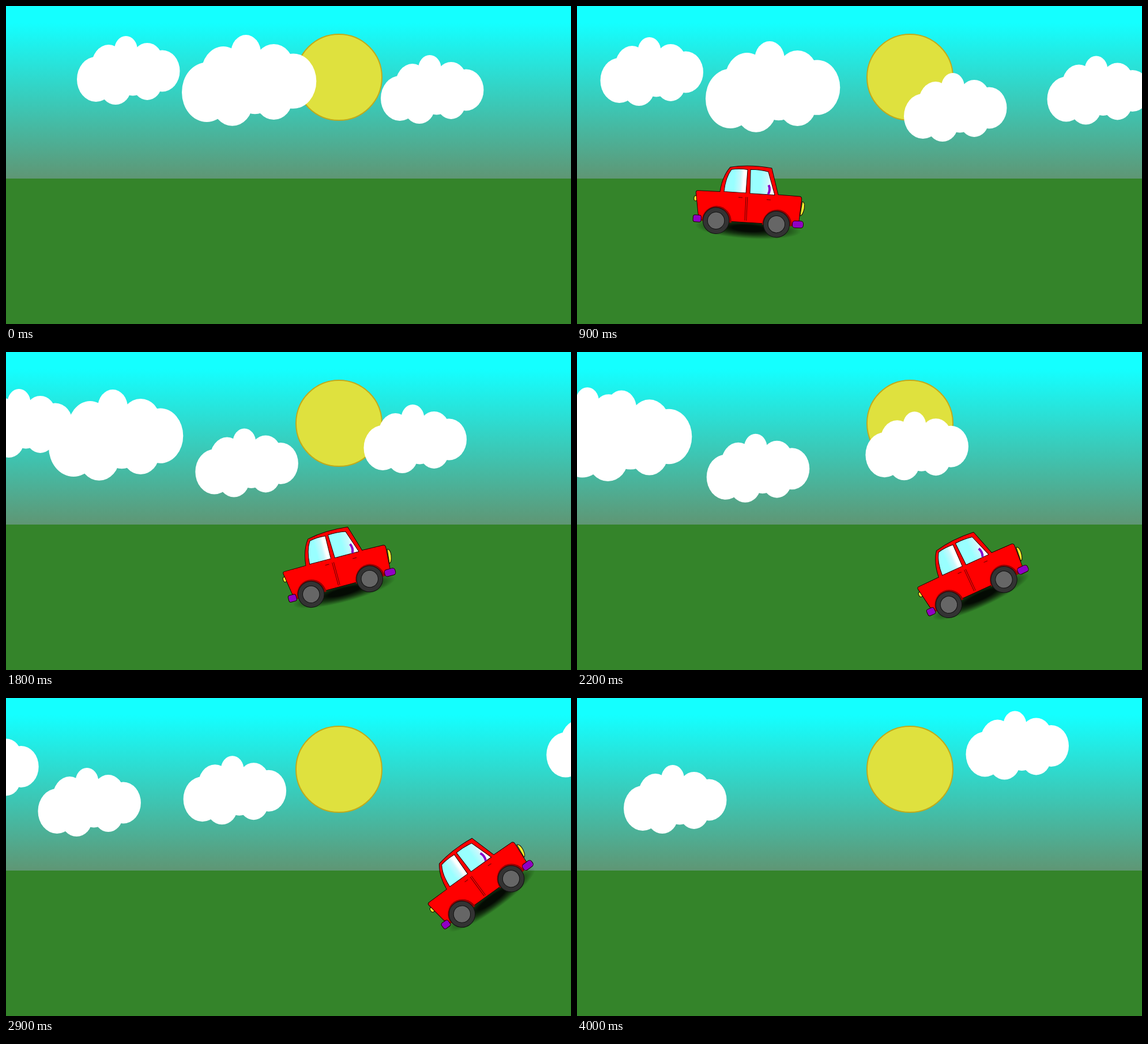
An HTML page for the animation above (4.05 s loop, 980 by 551 pixels).

```html
<!DOCTYPE html>
<html lang="en">
<head>
<meta charset="utf-8">
<title>Red car on a sunny day</title>
<style>
  html, body { margin: 0; height: 100%; overflow: hidden; }
  svg { display: block; width: 100vw; height: 100vh; }
</style>
</head>
<body>
<svg viewBox="0 0 980 551" preserveAspectRatio="none">
  <defs>
    <linearGradient id="sky" x2="0" y2="1">
      <stop offset=".1" stop-color="#14ffff"/>
      <stop offset="1" stop-color="#5f9674"/>
    </linearGradient>
    <linearGradient id="glass">
      <stop offset=".42" stop-color="#9ff"/>
      <stop offset=".7" stop-color="#c8f8fc"/>
      <stop offset=".85" stop-color="#fff"/>
    </linearGradient>
    <radialGradient id="shade">
      <stop offset=".3" stop-opacity=".92"/>
      <stop offset=".6" stop-opacity=".6"/>
      <stop offset="1" stop-opacity="0"/>
    </radialGradient>
    <g id="cloud" fill="#fff">
      <ellipse cx="33" cy="75" rx="33" ry="39"/>
      <ellipse cx="55" cy="53" rx="30" ry="38"/>
      <ellipse cx="85" cy="24" rx="20" ry="24"/>
      <ellipse cx="122" cy="43" rx="27" ry="31"/>
      <ellipse cx="148" cy="60.5" rx="30.5" ry="36"/>
      <ellipse cx="67" cy="89" rx="27" ry="30"/>
      <ellipse cx="97" cy="85" rx="22" ry="18.5"/>
      <ellipse cx="122" cy="83" rx="25" ry="28"/>
      <ellipse cx="90" cy="60" rx="50" ry="40"/>
    </g>
    <g id="wheel" stroke="#111">
      <path d="M-25 2A26 27.5 0 0 1 27 2Z" fill="#960000" stroke="none"/>
      <circle r="22.7" fill="#333"/>
      <circle r="14.7" fill="#666"/>
    </g>
  </defs>

  <rect width="980" height="299" fill="url(#sky)"/>
  <rect y="299" width="980" height="252" fill="#34842a"/>
  <circle cx="577.5" cy="123.5" r="74.5" fill="#dfe13e" stroke="#c0aa1c" stroke-width="2"/>
  <g id="clouds"></g>

  <!-- the origin is midway between the wheel hubs -->
  <g id="car" stroke="#200" stroke-linejoin="round">
    <ellipse cx="4" cy="10" rx="92" ry="18" fill="url(#shade)" stroke="none"/>
    <ellipse cx="-90" cy="-36.5" rx="3" ry="4.5" fill="#f2f22e"/>
    <path d="M-87 -50L-48.7 -50.5C-47 -68 -42 -83 -33.3 -94Q0 -101 38.6 -96.5L52.4 -51.3L90 -50.5Q94 -50 93.5 -45L91 -6L80 0H-80L-84.2 -10L-90 -46Q-90.5 -50 -87 -50Z" fill="red"/>
    <g fill="url(#glass)">
      <path d="M-41.7 -51C-41 -67 -37 -81 -31 -90Q-18 -93 -3 -91.5L-3.6 -51Z"/>
      <path d="M2 -92Q18 -93 33 -90L46.5 -50.5L3.4 -50.5Z"/>
    </g>
    <path d="M35 -51Q39 -59 35 -67" fill="none" stroke="#8a00c8" stroke-width="4"/>
    <path d="M-3.2 -44L-2.8 -3M-.4 -44L0 -3M-16 -42.5H-9M33 -41.5H40" fill="none" stroke="#600"/>
    <path d="M95 -42Q100 -41 99 -30Q97 -18 92.5 -17Z" fill="#f2f22e"/>
    <use href="#wheel" x="-52.5"/>
    <use href="#wheel" x="52.5"/>
    <g fill="#9000c4">
      <rect x="-92.5" y="-7.8" width="14" height="12" rx="3.5"/>
      <rect x="80" y="-8" width="19" height="12" rx="4.5"/>
    </g>
  </g>
</svg>
<script>
const LOOP = 4050, STEP = 50;

// Key points are [time, x, y]; the car adds its angle.
const cloudPaths = [
  [[0, 123, 52], [900, 40.5, 54], [1800, -62.5, 64], [2550, -75, 58], [3300, -190, 60]],
  [[0, 305, 50], [900, 223, 61], [1800, 74, 65], [2550, -139, 67.5]],
  [[0, 650, 85], [900, 567, 116], [1400, 433, 123], [2550, 137, 141], [3350, -45, 82]],
  [[0, 998, 85], [1800, 620.5, 91], [2550, 392, 111], [3350, 211, 86], [4000, 81, 116]],
  [[2750, 985, 25], [3350, 801, 20], [4000, 674.5, 22.5]]
];
const carPath = [
  [0, -107, 196, 20], [900, 293.5, 375, 3.5], [1400, 500, 395.5, -6], [1800, 580, 406.5, -14.8],
  [2550, 783, 403.5, -31.7], [3350, 897, 241, -39], [4000, 1095, 95, -42]
];

// Smooth curve through the key points, straight on beyond either end.
function along(path, t) {
  const last = path.length - 1;
  const key = i => path[Math.max(0, Math.min(last, i))];
  const slope = (a, b, n) => (b[n] - a[n]) / (b[0] - a[0]);
  let i = path.findIndex(p => p[0] > t) - 1;
  if (i === -1) return path[0].slice(1);
  const ended = i < 0;
  if (ended) i = last - 1;
  const a = key(i), b = key(i + 1), span = b[0] - a[0], k = (t - a[0]) / span;
  return a.map((v, n) => {
    const move = b[n] - v;
    if (ended) return v + move * k;
    const bendIn = slope(key(i - 1), b, n) * span - move;
    const bendOut = slope(a, key(i + 2), n) * span - move;
    return v + move * k + k * (1 - k) * (bendIn * (1 - k) - bendOut * k);
  }).slice(1);
}

const car = document.getElementById('car');
const clouds = cloudPaths.map(() => {
  const use = document.createElementNS('http://www.w3.org/2000/svg', 'use');
  use.setAttribute('href', '#cloud');
  document.getElementById('clouds').append(use);
  return use;
});

function draw(now) {
  const t = Math.floor(now % LOOP / STEP) * STEP;
  clouds.forEach((cloud, i) => {
    const scale = i === 1 ? 'scale(1.307 1.325)' : '';
    cloud.setAttribute('transform', `translate(${along(cloudPaths[i], t)}) ${scale}`);
  });
  const [x, y, angle] = along(carPath, t);
  car.setAttribute('transform', `translate(${x} ${y}) rotate(${angle})`);
}

const start = performance.now();
function tick() {
  draw(performance.now() - start);
  requestAnimationFrame(tick);
}
tick();
</script>
</body>
</html>
```
